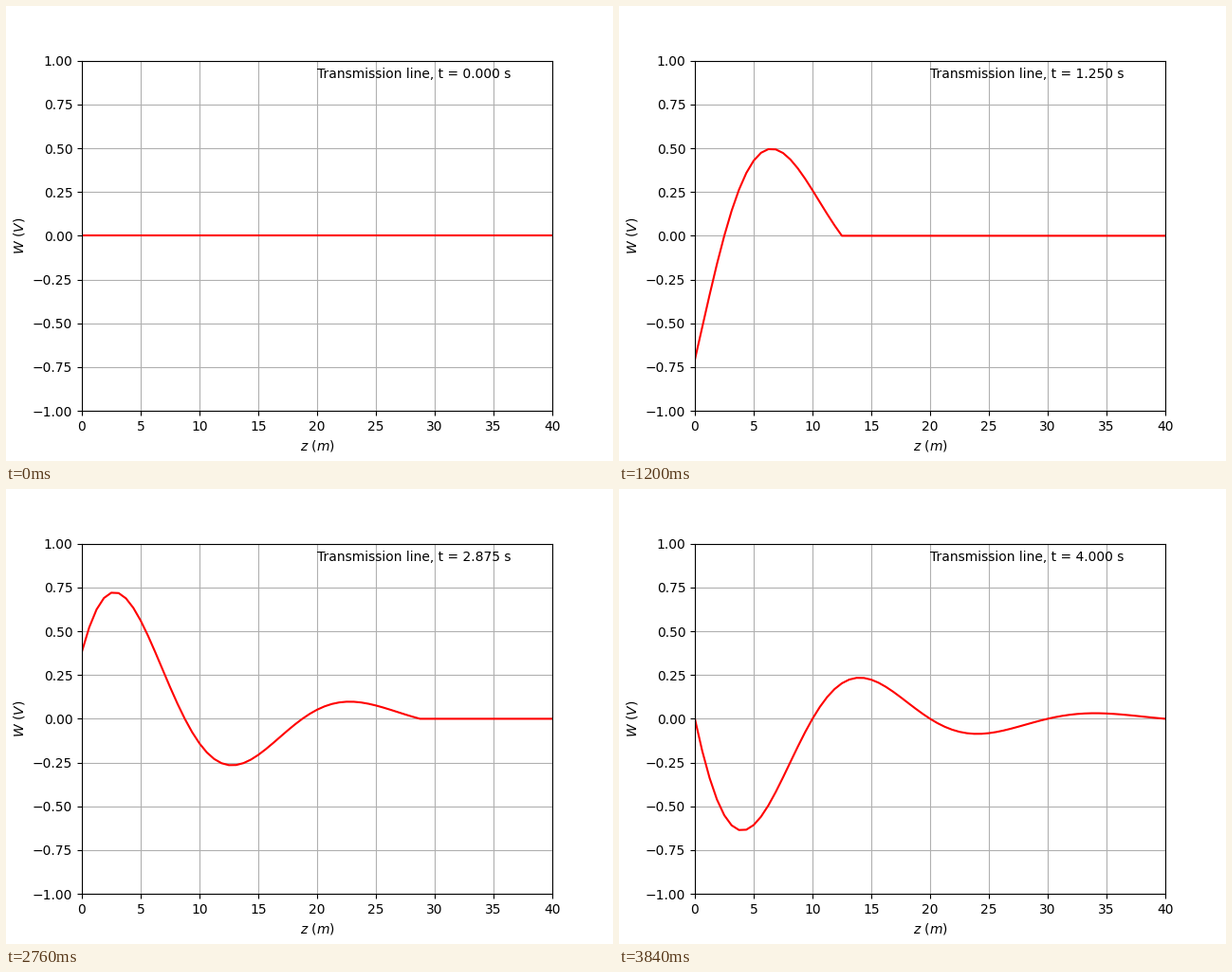
These frames come from a looping animation (640 px wide and 480 px high, 3900 ms). A matplotlib script:

```python
import numpy as np
import matplotlib.pyplot as plt
from matplotlib.animation import FuncAnimation

LENGTH = 40.0   # m
SPEED = 10.0    # m/s
FREQ = 0.5      # Hz
DECAY = 0.1     # 1/m
STEPS = 64
DT = LENGTH / SPEED / STEPS

z = np.linspace(0, LENGTH, STEPS + 1)


def voltage(t):
    """Damped sine travelling from z = 0, zero ahead of the wavefront."""
    delay = np.maximum(t - z / SPEED, 0)
    return np.exp(-DECAY * z) * np.sin(2 * np.pi * FREQ * delay)


fig, ax = plt.subplots(figsize=(6.4, 4.8), dpi=100)
ax.set_xlim(0, LENGTH)
ax.set_ylim(-1, 1)
ax.set_xlabel(r"$z \ (m)$")
ax.set_ylabel(r"$W \ (V)$")
ax.grid(True)
line, = ax.plot(z, voltage(0), "r-", lw=1.5)
label = ax.text(20, 0.9, "")


def update(n):
    t = n * DT
    line.set_ydata(voltage(t))
    label.set_text(f"Transmission line, t = {t:.3f} s")
    return line, label


anim = FuncAnimation(fig, update, frames=STEPS + 1, interval=60,
                     repeat=True, repeat_delay=0)
plt.show()
```
